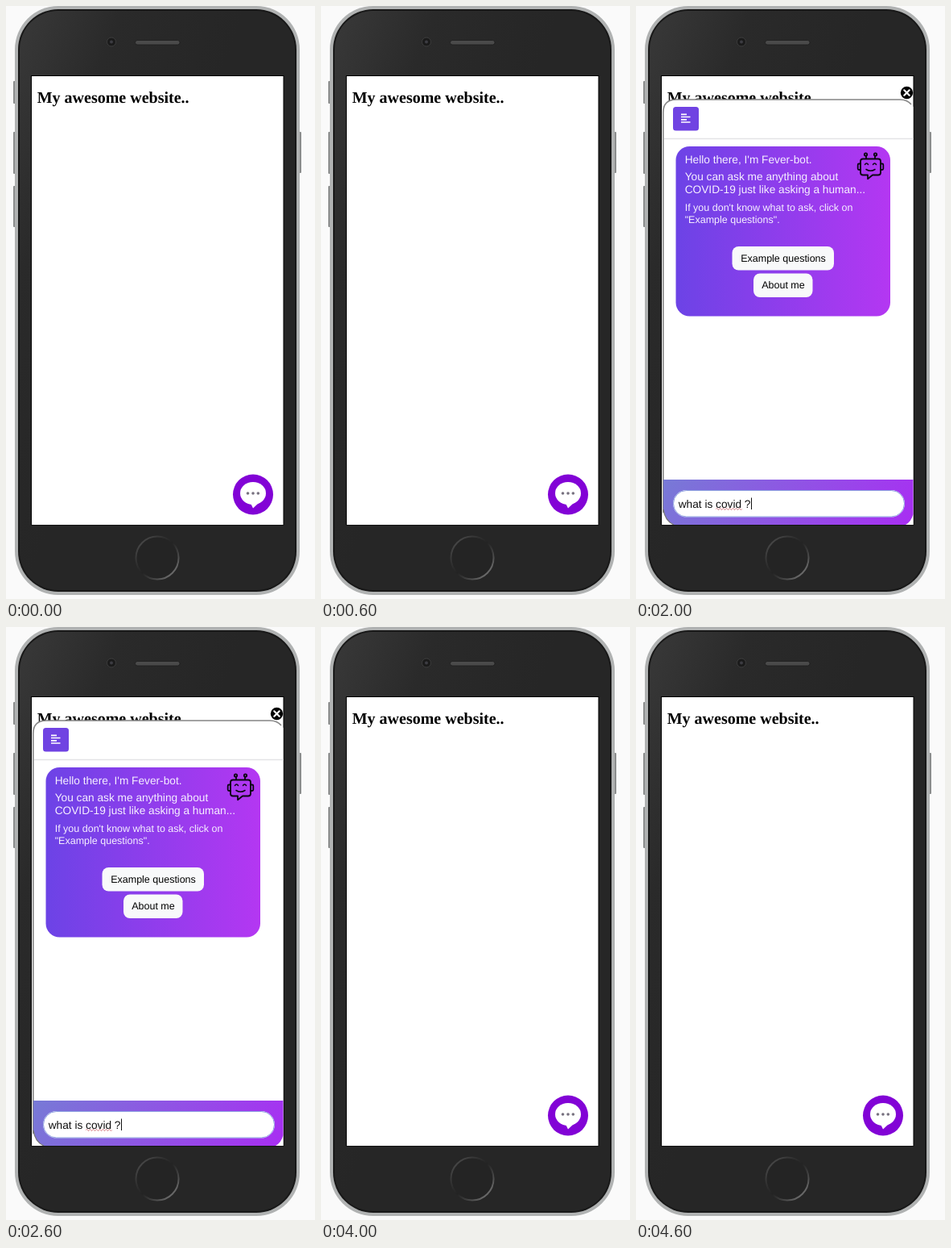
Recreate the animation shown at these times as an HTML page. Size 384 by 735 pixels, loop 5 s.

```html
<!DOCTYPE html>
<html lang="en">
<head>
<meta charset="utf-8">
<title>Chat widget demo</title>
<style>
  html, body { margin: 0; width: 100%; height: 100%; overflow: hidden; background: #fafafa; }
  svg { display: block; width: 384px; height: 735px; }
  text { font-family: "Liberation Sans", Arial, sans-serif; text-rendering: geometricPrecision; white-space: pre; }
  .heading { font: bold 20px "Liberation Serif", "Times New Roman", serif; }
  .big { font-size: 13.7px; }
  .small { font-size: 12.5px; }
  .body { font-size: 11.93px; }
  .video-title { font: 14.7px Roboto, sans-serif; }
  .light { fill: #f6f0ff; }
  .mid { text-anchor: middle; }

  /* Hard cuts between the five one-second steps */
  .home, .chat, .intro, .empty, .typed, .answer { visibility: hidden; animation: 5s step-end infinite; }
  .home { animation-name: home; }
  .chat { animation-name: chat; }
  .intro { animation-name: intro; }
  .empty { animation-name: empty; }
  .typed { animation-name: typed; }
  .answer { animation-name: answer; }
  @keyframes home { 0%, 80% { visibility: visible } 20% { visibility: hidden } 100% { visibility: visible } }
  @keyframes chat { 0%, 80%, 100% { visibility: hidden } 20% { visibility: visible } }
  @keyframes intro { 0%, 60%, 100% { visibility: hidden } 20% { visibility: visible } }
  @keyframes empty { 0%, 40%, 80%, 100% { visibility: hidden } 20%, 60% { visibility: visible } }
  @keyframes typed { 0%, 60%, 100% { visibility: hidden } 40% { visibility: visible } }
  @keyframes answer { 0%, 80%, 100% { visibility: hidden } 60% { visibility: visible } }
</style>
</head>
<body>
<svg viewBox="0 0 384 735" xmlns="http://www.w3.org/2000/svg">
  <defs>
    <linearGradient id="shell" x2=".5" y2=".4">
      <stop stop-color="#393939"/><stop offset=".45" stop-color="#2a2a2a"/><stop offset="1" stop-color="#262626"/>
    </linearGradient>
    <linearGradient id="ring" x2="1" y2="1">
      <stop stop-color="#555"/><stop offset=".3" stop-color="#333"/><stop offset=".5" stop-color="#232323"/>
      <stop offset=".7" stop-color="#444"/><stop offset="1" stop-color="#8a8a8a"/>
    </linearGradient>
    <linearGradient id="card"><stop stop-color="#6c43e6"/><stop offset="1" stop-color="#b437f2"/></linearGradient>
    <linearGradient id="footer" gradientUnits="userSpaceOnUse" x1="60" y1="540" x2="320" y2="690">
      <stop stop-color="#777ad6"/><stop offset="1" stop-color="#a92df3"/>
    </linearGradient>
    <linearGradient id="photo" x2="1" y2=".6">
      <stop stop-color="#3d2c19"/><stop offset=".35" stop-color="#21170d"/>
      <stop offset=".7" stop-color="#3a2814"/><stop offset="1" stop-color="#1c140d"/>
    </linearGradient>
    <radialGradient id="blob">
      <stop stop-color="#b58c4c"/><stop offset=".7" stop-color="#a47836"/><stop offset=".92" stop-color="#8a602c"/>
      <stop offset="1" stop-color="#5a3c1c" stop-opacity="0"/>
    </radialGradient>
    <linearGradient id="shade" x2="0" y2="1">
      <stop stop-color="#000" stop-opacity=".55"/><stop offset="1" stop-color="#000" stop-opacity="0"/>
    </linearGradient>
    <clipPath id="screen"><rect x="32" y="87" width="313" height="556"/></clipPath>
    <clipPath id="view"><rect x="34" y="165" width="311" height="422"/></clipPath>
    <clipPath id="frame"><rect x="58" y="441" width="248" height="139"/></clipPath>
    <g id="robot" fill="none" stroke="#0b0612" stroke-width="1.8" stroke-linecap="round" stroke-linejoin="round">
      <path d="M282 189.500H301Q304 189.500 304 192.500V206.500Q304 209.500 301 209.500H294L288 214.300V209.500H282Q279 209.500 279 206.500V192.500Q279 189.500 282 189.500Z"/>
      <path d="M279 195.500H277Q275.700 195.500 275.700 197V201.500Q275.700 203 277 203H279M304 195.500H306Q307.300 195.500 307.300 197V201.500Q307.300 203 306 203H304"/>
      <path d="M286 189V186M297 189V186"/>
      <circle cx="285.500" cy="184" r="1.700"/><circle cx="297.500" cy="184" r="1.700"/>
      <path stroke-width="1.500" d="M284.500 196.500Q286.500 193.500 288.500 196.500M294.500 196.500Q296.500 193.500 298.500 196.500M286 202.500Q291.500 206 297 202.500"/>
    </g>
  </defs>

  <!-- Phone -->
  <rect width="384" height="735" fill="#fafafa"/>
  <g fill="#8b8d8d">
    <rect x="9" y="93" width="4" height="28" rx="1"/>
    <rect x="9" y="156" width="4" height="52" rx="1"/>
    <rect x="9" y="223" width="4" height="51" rx="1"/>
    <rect x="363" y="156" width="4" height="51" rx="1"/>
  </g>
  <rect x="11" y="0" width="354" height="730" rx="54" fill="#b0b2b2"/>
  <rect x="15" y="4" width="346" height="722" rx="50" fill="#181818"/>
  <rect x="17" y="6" width="342" height="718" rx="48" fill="url(#shell)"/>
  <circle cx="131" cy="44.500" r="5.500" fill="#1b1b1b" stroke="#3d3d3d"/>
  <circle cx="131" cy="44.500" r="2" fill="#3c3c42"/>
  <rect x="160.500" y="42.500" width="55.500" height="5.500" rx="2.700" fill="#4a4a4a" stroke="#1c1c1c" stroke-width=".8"/>
  <circle cx="188" cy="684" r="26.500" fill="#242424" stroke="url(#ring)" stroke-width="2"/>
  <rect x="31" y="86" width="314.500" height="557.500" fill="#000"/>
  <rect x="32" y="87" width="312.500" height="556" fill="#fff"/>

  <g clip-path="url(#screen)">
    <text class="heading" x="38.700" y="120">My awesome website..</text>

    <g class="home">
      <circle cx="307" cy="605.500" r="25" fill="#8203d6"/>
      <ellipse cx="307" cy="604" rx="16" ry="14" fill="#fff"/>
      <path d="M304 616.500L307 622.500L315 615Z" fill="#fff"/>
      <g fill="#77717f"><circle cx="300.500" cy="604" r="1.800"/><circle cx="307" cy="604" r="1.800"/><circle cx="313.300" cy="604" r="1.800"/></g>
    </g>

    <g class="chat">
      <circle cx="336.500" cy="107.500" r="7.700" fill="#000"/>
      <path d="M333.300 104.300L339.700 110.700M339.700 104.300L333.300 110.700" stroke="#fff" stroke-width="2.200" stroke-linecap="round"/>
      <path d="M34 643V132Q34 116 50 116H329Q338 116 344.500 125V643Z" fill="#fff"/>
      <path d="M33.800 628V132Q33.800 116 50 116H328Q337 116 342 122" fill="none" stroke="#858585" stroke-width="1.600"/>
      <path d="M35 164.500H344.500" stroke="#e4e4e6" stroke-width="1.500"/>
      <rect x="46" y="125" width="32" height="29.500" rx="3.500" fill="#7043e2"/>
      <path d="M56 134.300H63M56 137.500H67.500M56 140.800H63M56 144H67.500" stroke="#fff" stroke-width="1.700"/>
    </g>

    <g class="intro">
      <rect x="49.500" y="174" width="266.500" height="210.500" rx="17" fill="url(#card)"/>
      <g class="light">
        <text class="big" x="60.700" y="194.500">Hello there, I'm Fever-bot.</text>
        <text class="big" x="60.700" y="216">You can ask me anything about</text>
        <text class="big" x="60.700" y="232">COVID-19 just like asking a human...</text>
        <text class="small" x="60.700" y="254">If you don't know what to ask, click on</text>
        <text class="small" x="60.700" y="269">"Example questions".</text>
      </g>
      <rect x="119.500" y="298" width="126.500" height="29.500" rx="8" fill="#f8f9fa"/>
      <text class="small mid" x="183" y="317">Example questions</text>
      <rect x="146" y="331.500" width="73.500" height="29.500" rx="8" fill="#f8f9fa"/>
      <text class="small mid" x="183" y="350">About me</text>
      <use href="#robot"/>
    </g>

    <g class="answer">
      <g clip-path="url(#view)">
        <path d="M329.500 165V587" stroke="#c4c4c4" stroke-width="1.300"/>
        <path d="M329.500 165V294" stroke="#a2a2a2" stroke-width="1.500"/>
        <rect x="49.500" y="194" width="265" height="430" rx="17" fill="url(#card)"/>
        <text class="light" font-size="14.900" x="57.700" y="215">What is COVID-19?</text>
        <g class="light body">
          <text x="57.700" y="248">Coronaviruses (CoVs) are a class of genetic</text>
          <text x="57.700" y="265.500">diverse viruses in a wide range of host</text>
          <text x="57.700" y="283">species, including birds and animals. COVID-</text>
          <text x="57.700" y="300.500">19 is caused by SARS-COV2 and is a new</text>
          <text x="57.700" y="318">strain that has not been previously identified in</text>
          <text x="57.700" y="335.500">humans.</text>
          <text x="57.700" y="370.500">Based on the large number of infected people</text>
          <text x="57.700" y="388">that were exposed to the wet animal market in</text>
          <text x="57.700" y="405.500">Wuhan City, China, it is suggested that this is</text>
          <text x="57.700" y="423">likely the zoonotic origin of COVID-19.</text>
        </g>
        <use href="#robot" x="-1.800" y="20.300"/>
        <g clip-path="url(#frame)">
          <rect x="58" y="441" width="248" height="139" fill="url(#photo)"/>
          <ellipse cx="96" cy="545" rx="48" ry="30" fill="#5a4020" opacity=".35"/>
          <circle cx="226" cy="498" r="41" fill="url(#blob)"/>
          <rect x="58" y="441" width="248" height="65" fill="url(#shade)"/>
        </g>
        <circle cx="84.500" cy="468" r="16.700" fill="#fff"/>
        <text class="video-title" x="110" y="473.500" fill="#eee">#VIRAL42 - when to...</text>
        <g fill="#eee"><circle cx="275" cy="463.300" r="1.600"/><circle cx="275" cy="468.300" r="1.600"/><circle cx="275" cy="473.300" r="1.600"/></g>
        <rect x="162" y="491" width="40" height="40" fill="#f00"/>
      </g>
    </g>

    <g class="chat">
      <path d="M34 587H344.500V630Q342 639 335 643H47Q36 639 34 625Z" fill="url(#footer)"/>
      <path d="M34 624Q36 638 47 643" fill="none" stroke="#777" stroke-width="1.300"/>
      <rect x="46" y="600" width="288" height="33.500" rx="16.700" fill="#fff"/>
    </g>
    <text class="empty big" x="52.700" y="621.500" fill="#777">Ask me anything...</text>
    <g class="typed">
      <rect x="46.500" y="600.500" width="287" height="32.500" rx="16.200" fill="none" stroke="#5d78d2" stroke-opacity=".7"/>
      <text class="big" x="52.700" y="621.500" fill="#111">what is covid ?</text>
      <path d="M99.500 623.500q1 -2 2 0t2 0t2 0t2 0t2 0t2 0t2 0t2 0t2 0t2 0t2 0t2 0t2 0t2 0t2 0t2 0" fill="none" stroke="#c8545c" stroke-width=".9"/>
      <path d="M143.500 609.500V624" stroke="#111"/>
    </g>
  </g>
</svg>
</body>
</html>
```
